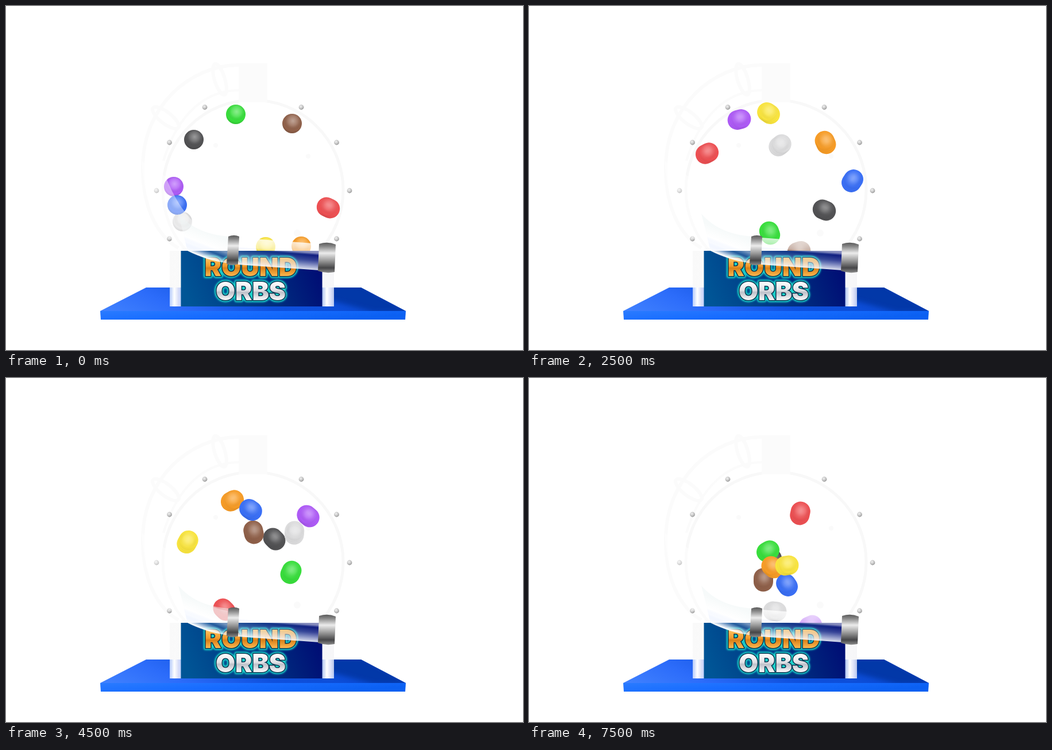
These frames come from a looping animation (900 px wide and 600 px high, 8000 ms). An HTML page:

```html
<!DOCTYPE html>
<html lang="en">
<head>
<meta charset="utf-8">
<title>Draw machine</title>
<style>
  html, body { margin: 0; width: 100%; height: 100%; overflow: hidden; background: #fff; }
  svg { display: block; width: 900px; height: 600px; }
  .sign { font: 900 44px Inter, "Open Sans", sans-serif; text-anchor: middle; stroke-linejoin: round; }
  .glow { fill: #1cdccf; stroke: #1cdccf; stroke-width: 7; filter: url(#soft); }
  .edge { fill: #0a3350; stroke: #0a3350; stroke-width: 3; }
  .pale { fill: none; stroke: #fbfbfb; stroke-width: 6; }
</style>
</head>
<body>
<svg viewBox="0 0 900 600">
  <defs>
    <filter id="soft" x="-10%" y="-20%" width="120%" height="140%"><feGaussianBlur stdDeviation="1.4"/></filter>
    <filter id="blur"><feGaussianBlur stdDeviation="4"/></filter>
    <linearGradient id="top" gradientUnits="userSpaceOnUse" x1="200" y1="560" x2="330" y2="300">
      <stop offset="0" stop-color="#4485ff"/><stop offset=".25" stop-color="#2c6cfa"/>
      <stop offset=".5" stop-color="#0f50dd"/><stop offset="1" stop-color="#0848cc"/>
    </linearGradient>
    <linearGradient id="front" x1="0" x2="1" y1="0" y2=".4">
      <stop offset="0" stop-color="#2a7bff"/><stop offset=".5" stop-color="#176cff"/>
      <stop offset="1" stop-color="#0b60f2"/>
    </linearGradient>
    <linearGradient id="panel" x1="0" x2="1" y1=".55" y2=".4">
      <stop offset="0" stop-color="#005596"/><stop offset=".5" stop-color="#003582"/>
      <stop offset="1" stop-color="#000c74"/>
    </linearGradient>
    <linearGradient id="post">
      <stop offset="0" stop-color="#fff" stop-opacity=".65"/><stop offset=".4" stop-color="#fff"/>
      <stop offset=".75" stop-color="#d9dff8"/><stop offset="1" stop-color="#eef0ff" stop-opacity=".75"/>
    </linearGradient>
    <linearGradient id="postTop">
      <stop offset="0" stop-color="#f9f9f9"/><stop offset=".5" stop-color="#fff"/>
      <stop offset="1" stop-color="#f6f6f8"/>
    </linearGradient>
    <linearGradient id="tube" gradientUnits="userSpaceOnUse" x1="475" y1="408" x2="471" y2="457">
      <stop offset="0" stop-color="#fff" stop-opacity=".8"/>
      <stop offset=".36" stop-color="#fff" stop-opacity=".5"/>
      <stop offset=".44" stop-color="#c8d4ff" stop-opacity=".08"/>
      <stop offset=".62" stop-color="#dbe4ff" stop-opacity=".25"/>
      <stop offset="1" stop-color="#fff" stop-opacity=".95"/>
    </linearGradient>
    <linearGradient id="bend" gradientUnits="userSpaceOnUse" x1="370" y1="403" x2="355" y2="441">
      <stop offset="0" stop-color="#eef5f5" stop-opacity=".5"/>
      <stop offset=".5" stop-color="#fff" stop-opacity=".45"/>
      <stop offset=".7" stop-color="#d4e2ff" stop-opacity=".15"/>
      <stop offset="1" stop-color="#fff" stop-opacity=".95"/>
    </linearGradient>
    <linearGradient id="metal" x1="0" x2="0" y1="0" y2="1">
      <stop offset="0" stop-color="#5a5a5a"/><stop offset=".12" stop-color="#858585"/>
      <stop offset=".35" stop-color="#ececec"/><stop offset=".6" stop-color="#9a9a9a"/>
      <stop offset=".84" stop-color="#464648"/><stop offset="1" stop-color="#8c8c8c"/>
    </linearGradient>
    <linearGradient id="gold" x1="0" x2="0" y1=".2" y2=".82">
      <stop offset="0" stop-color="#ffc765"/><stop offset=".45" stop-color="#f09a2c"/>
      <stop offset=".55" stop-color="#d98018"/><stop offset="1" stop-color="#ffbd55"/>
    </linearGradient>
    <linearGradient id="silver" x1="0" x2="0" y1=".2" y2=".82">
      <stop offset="0" stop-color="#fff"/><stop offset=".45" stop-color="#e2e2e6"/>
      <stop offset=".56" stop-color="#bfc2ca"/><stop offset="1" stop-color="#fff"/>
    </linearGradient>
    <radialGradient id="bolt" cx=".4" cy=".35" r=".7">
      <stop offset="0" stop-color="#f2f2f2"/><stop offset=".6" stop-color="#c2c2c2"/>
      <stop offset="1" stop-color="#8f8f8f"/>
    </radialGradient>
    <radialGradient id="shade" cx=".54" cy=".36" r=".66">
      <stop offset="0" stop-color="#fff" stop-opacity=".3"/><stop offset=".4" stop-color="#fff" stop-opacity=".1"/>
      <stop offset=".75" stop-color="#000" stop-opacity="0"/><stop offset="1" stop-color="#000" stop-opacity=".1"/>
    </radialGradient>
    <clipPath id="deck"><path d="M244 491H618L696 532H164Z"/></clipPath>
  </defs>

  <rect width="900" height="600" fill="#fff"/>

  <!-- pale pipe and drum -->
  <g class="pale">
    <path d="M405 103C320 103 238 175 238 282C238 350 262 400 300 422"/>
    <path d="M405 147C350 147 300 185 274 270" stroke-width="4"/>
    <ellipse cx="372" cy="128" rx="9" ry="28" transform="rotate(-17 372 128)"/>
    <ellipse cx="278" cy="195" rx="10" ry="28" transform="rotate(-52 278 195)"/>
    <circle cx="430" cy="321" r="157" stroke="#f8f8f8" stroke-width="5"/>
  </g>
  <rect x="405" y="100" width="50" height="68" fill="#fbfbfb"/>
  <g fill="#fafafa">
    <circle cx="365" cy="243" r="4"/><circle cx="526" cy="262" r="4"/><circle cx="507" cy="396" r="6"/>
  </g>
  <g id="bolts" fill="url(#bolt)"></g>

  <!-- base -->
  <g clip-path="url(#deck)">
    <rect x="164" y="491" width="532" height="41" fill="url(#top)"/>
    <path d="M560 486H620L705 534H640L560 512Z" fill="#00339a" opacity=".75" filter="url(#blur)"/>
  </g>
  <path d="M164 532H696L695 547H165Z" fill="url(#front)"/>

  <g id="balls"></g>

  <!-- sign panel and posts -->
  <rect x="285" y="427" width="286" height="64" fill="url(#postTop)"/>
  <rect x="285" y="491" width="20" height="33" fill="url(#post)"/>
  <rect x="550" y="491" width="21" height="33" fill="url(#post)"/>
  <rect x="304.500" y="427" width="246" height="97" fill="url(#panel)"/>

  <g class="sign">
    <g class="glow"><text x="426" y="471">ROUND</text><text x="426" y="513">ORBS</text></g>
    <g class="edge"><text x="426" y="471">ROUND</text><text x="426" y="513">ORBS</text></g>
    <text x="426" y="471" fill="url(#gold)">ROUND</text>
    <text x="426" y="513" fill="url(#silver)">ORBS</text>
  </g>

  <!-- outlet tube -->
  <path d="M236 270C240 345 264 400 316 427H386V406C340 400 305 365 278 298Z" fill="#fff" fill-opacity=".42"/>
  <path d="M300 362C322 388 352 399 388 402V449C360 445 338 438 316 427C312 412 306 385 300 362Z" fill="url(#bend)"/>
  <path d="M404 404L546 415V461L404 451Z" fill="url(#tube)"/>
  <path d="M387 402Q397 398 406 402L404 450Q394 454 384 450Z" fill="url(#metal)"/>
  <path d="M545 415Q560 410 574 416L572 464Q557 467 543 462Z" fill="url(#metal)"/>
</svg>

<script>
const STEP = 500, STEPS = 16, RADIUS = 17, SMEAR = 7;
const KEYS = [0, 2, 5, 7, 9, 11, 15];

// path: x, y at each key step; bends: wall hits as step, x, y
const balls = [
  { color: '#525254', path: [327,233, 403,281, 514,356, 527,344, 467,281, 405,222, 424,318], bends: [[12, 388, 192]] },
  { color: '#dededf', path: [307,376, 358,323, 437,243, 499,202, 502,270, 488,340, 428,407], bends: [[13, 471, 412]] },
  { color: '#91614a', path: [498,205, 492,297, 470,428, 447,353, 431,269, 410,190, 408,352] },
  { color: '#ef5053', path: [561,352, 464,309, 310,257, 333,335, 380,404, 436,398, 472,236], bends: [[10, 409, 420]], rolling: true },
  { color: '#38e03c', path: [400,189, 406,272, 419,396, 459,407, 496,339, 525,266, 416,302], bends: [[6, 440, 424], [12, 541, 229]] },
  { color: '#f99d26', path: [514,419, 518,349, 516,238, 466,198, 394,214, 326,241, 424,330], bends: [[8, 430, 190]] },
  { color: '#af5bf8', path: [292,315, 313,263, 366,198, 449,208, 526,241, 562,305, 490,432], bends: [[13, 541, 410]] },
  { color: '#3a70f8', path: [298,347, 405,336, 563,305, 501,261, 426,230, 349,213, 449,361], bends: [[10, 390, 194]] },
  { color: '#fbe63e', path: [452,420, 446,328, 417,187, 360,228, 316,286, 293,350, 449,327] }
];

function add(parent, name, attrs) {
  const node = document.createElementNS('http://www.w3.org/2000/svg', name);
  for (const key in attrs) node.setAttribute(key, attrs[key]);
  return parent.appendChild(node);
}

const boltLayer = document.getElementById('bolts');
for (const deg of [30, 0, -30, -60, -120, -150, 180, 150]) {
  const a = deg * Math.PI / 180;
  add(boltLayer, 'circle', { cx: 430 + 168 * Math.cos(a), cy: 322 + 168 * Math.sin(a), r: 4.4 });
}

function place(track, step) {
  const i = Math.max(1, track.findIndex(p => p[0] >= step));
  const [s0, x0, y0] = track[i - 1], [s1, x1, y1] = track[i];
  const k = (step - s0) / (s1 - s0);
  return [x0 + (x1 - x0) * k, y0 + (y1 - y0) * k];
}

const ballLayer = document.getElementById('balls');
for (const ball of balls) {
  const points = KEYS.map((s, i) => [s, ball.path[2 * i], ball.path[2 * i + 1]]);
  ball.track = points.concat(ball.bends || []).sort((a, b) => a[0] - b[0]);
  ball.body = add(ballLayer, 'line', { stroke: ball.color, 'stroke-width': 2 * RADIUS, 'stroke-linecap': 'round' });
  ball.shades = [-1, 0, 1].map(side => ({
    side,
    node: add(ballLayer, 'circle', { r: RADIUS, fill: 'url(#shade)', opacity: .55 })
  }));
}

function pose(ball, step) {
  const [x, y] = place(ball.track, step);
  const [ax, ay] = place(ball.track, Math.max(0, step - .4));
  const [bx, by] = place(ball.track, Math.min(STEPS - 1, step + .4));
  const still = step === 0 && !ball.rolling;
  const scale = still ? 0 : SMEAR / 2 / (Math.hypot(bx - ax, by - ay) || 1);
  const dx = (bx - ax) * scale, dy = (by - ay) * scale;
  const ends = { x1: x - dx, y1: y - dy, x2: x + dx + .01, y2: y + dy };
  for (const key in ends) ball.body.setAttribute(key, ends[key]);
  for (const { side, node } of ball.shades) {
    node.setAttribute('cx', x + dx * side);
    node.setAttribute('cy', y + dy * side);
  }
}

const start = performance.now();
let shown = -1;
function draw() {
  const step = Math.floor((performance.now() - start) / STEP) % STEPS;
  if (step !== shown) {
    shown = step;
    balls.forEach(ball => pose(ball, step));
  }
  requestAnimationFrame(draw);
}
draw();
</script>
</body>
</html>
```
